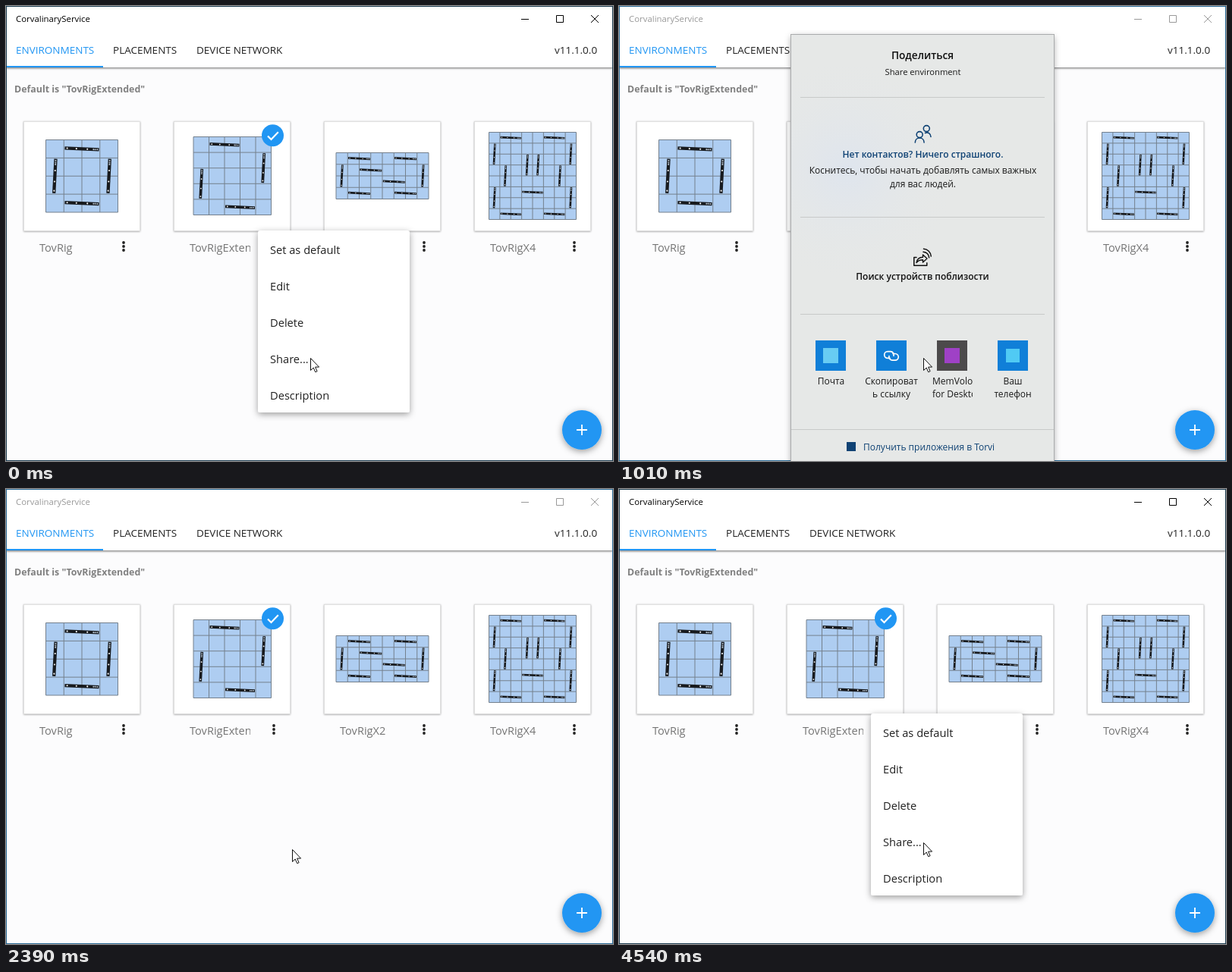
An HTML page that plays this animation: 800 px wide and 600 px high, repeating every 4.74 s.

```html
<!DOCTYPE html>
<html lang="en">
<head>
<meta charset="utf-8">
<title>Share an environment</title>
<style>
  html, body { margin: 0; width: 100%; height: 100%; overflow: hidden; background: #fcfcfd; }
  svg { display: block; width: 800px; height: 600px; }
  text { font-family: "Open Sans", "Noto Sans", sans-serif; white-space: pre; }
  .mid { text-anchor: middle; }
  .semi { font-weight: 600; }
  .line { fill: none; stroke-linecap: round; stroke-linejoin: round; }
</style>
</head>
<body>
<svg id="stage" viewBox="0 0 800 600" xmlns="http://www.w3.org/2000/svg"></svg>
<script>
const LOOP = 4740, STEP = 70;
const BLUE = '#2196f3', NAVY = '#0f4274', TILE = '#0078d7';
const KIT = 'TovRig';
const stage = document.getElementById('stage');

// ---- drawing helpers ----
const text = (x, y, size, fill, str, cls = '') =>
  `<text x="${x}" y="${y}" font-size="${size}" fill="${fill}" class="${cls}">${str}</text>`;
const rect = (x, y, w, h, fill, more = '') =>
  `<rect x="${x}" y="${y}" width="${w}" height="${h}" fill="${fill}" ${more}/>`;
const circle = (x, y, r, fill, more = '') =>
  `<circle cx="${x}" cy="${y}" r="${r}" fill="${fill}" ${more}/>`;
const line = (d, stroke, width, more = '') =>
  `<path class="line" d="${d}" stroke="${stroke}" stroke-width="${width}" ${more}/>`;
const shadow = (id, dy, blur, alpha) =>
  `<filter id="${id}" x="-30%" y="-30%" width="160%" height="160%">
    <feDropShadow dx="0" dy="${dy}" stdDeviation="${blur}" flood-opacity="${alpha}"/></filter>`;

// A tracking bar two cells long, centred on a cell coordinate.
function bar(cell, cx, cy, upright) {
  const len = cell * 1.9, thick = Math.max(2.4, cell * 0.18), r = thick * 0.24;
  const dots = [-0.43, -0.16, 0.16, 0.34, 0.39, 0.45]
    .map(k => circle((k * len).toFixed(2), 0, r.toFixed(2), k < 0.2 ? '#fff' : '#b8c4d0')).join('');
  return `<g transform="translate(${cx} ${cy}) rotate(${upright ? -87 : 2.5})">` +
    rect(-len / 2, -thick / 2, len, thick, '#171a1e') + dots + '</g>';
}

function floor(x, y, w, h, cols, rows, flat, upright) {
  const cw = w / cols, ch = h / rows;
  let d = `M${x} ${y}h${w}v${h}h${-w}z`;
  for (let i = 1; i < cols; i++) d += `M${x + i * cw} ${y}v${h}`;
  for (let i = 1; i < rows; i++) d += `M${x} ${y + i * ch}h${w}`;
  const place = up => ([a, b]) => bar(cw, x + a * cw, y + b * ch, up);
  return `<path d="${d}" fill="#aecdf1" stroke="#74808d" stroke-width="1"/>` +
    flat.map(place(false)).join('') + upright.map(place(true)).join('');
}

const kebab = x => [312, 317, 322].map(y => circle(x, y, 1.9, '#222')).join('');

function card(i, name, plan) {
  const x = 23 + 198 * i;
  return rect(x + .5, 152.5, 153, 144, '#fff', 'filter="url(#soft)" stroke="#d6d6d6" stroke-width=".6"') + plan +
    `<g clip-path="url(#label${i})">${text(x + 21, 324, 14.6, '#757575', name)}</g>` + kebab(x + 132);
}

// ---- parts of the scene ----
const cards = [
  card(0, KIT, floor(52.5, 176.5, 95, 95.5, 4, 4, [[2, .5], [2, 3.5]], [[.5, 2], [3.5, 2]])),
  card(1, KIT + 'Extended', floor(247, 172.5, 102.5, 103, 5, 5, [[2, .5], [3, 4.5]], [[.5, 3], [4.5, 2]])),
  card(2, KIT + 'X2', floor(435, 193.5, 122, 61, 8, 4,
    [[2, .5], [6, .5], [3, 1.5], [5, 2.5], [2, 3.5], [6, 3.5]], [[.5, 2], [7.5, 2]])),
  card(3, KIT + 'X4', floor(636.5, 166.5, 115, 115, 8, 8,
    [[2, .5], [6, .5], [4, 5.5], [2, 7.5], [6, 7.5]],
    [[.5, 2], [7.5, 2], [1.5, 4], [3.5, 3], [4.5, 3], [6.5, 4], [.5, 6], [7.5, 6]]))
].join('');

const header =
  rect(0, 0, 800, 81, '#fff', 'filter="url(#bar)"') +
  text(13, 63, 13.5, BLUE, 'ENVIRONMENTS') +
  text(141, 63, 13.5, '#212121', 'PLACEMENTS') +
  text(251, 63, 13.5, '#212121', 'DEVICE NETWORK') +
  text(723, 63, 13.5, '#212121', 'v11.1.0.0') +
  rect(0, 79, 128, 2, BLUE) +
  `<g id="caption">${text(13, 21, 11.4, 'currentColor', 'CorvalinaryService')}
   <path d="M679 17.5h10M725.5 12.5h9v9h-9zM771 12l10 10M781 12l-10 10" fill="none" stroke="currentColor"/></g>`;

const badge = circle(351.5, 170.7, 14.5, BLUE) +
  '<path d="M345 171.5l4.5 4.5 9.3-9.8" fill="none" stroke="#fff" stroke-width="2.2"/>';

const fab = circle(759, 559, 26, BLUE, 'filter="url(#lift)"') +
  '<path d="M752 559h14M759 552v14" stroke="#fff" stroke-width="1.8"/>';

const menu = rect(332, 296, 200, 240, '#fff', 'rx="3" filter="url(#lift)"') +
  ['Set as default', 'Edit', 'Delete', 'Share...', 'Description']
    .map((s, i) => text(348, 327 + 48 * i, 14.65, '#212121', s)).join('');

const people =
  circle(405.3, 161.6, 4, 'none', `stroke="${NAVY}" stroke-width="1.6"`) +
  circle(396.2, 169.6, 4, 'none', `stroke="${NAVY}" stroke-width="1.6"`) +
  line('M390.3 180c0-8 11.8-8 11.8 0M403.5 167.4c4-1.6 7.5 1 7.5 5', NAVY, 1.6);

const nearby =
  line('M392 331.5h-3.2v10.7h17v-3.4', '#111', 1.5) +
  line('M392 338.5c.8-5 4-7.300 8.500-7.300v-3.200l5.500 5-5.500 5v-3.200c-3.800 0-6.500 1-8.500 3.700z', '#111', 1.4) +
  line('M401 324.300c4.200.4 7.200 3.300 7.700 7.500M401.500 320.300c5.400.4 9.300 4.400 9.800 9.800', '#111', 1.5);

const chain = '<g class="line" stroke="#fff" stroke-width="1.7">' +
  '<path d="M357 465.300h-3a4.300 4.300 0 0 1 0-8.600h4a4.300 4.300 0 0 1 4 5.600"/>' +
  '<path d="M361 459.500h3a4.300 4.300 0 0 1 0 8.600h-4a4.300 4.300 0 0 1-4-5.600"/></g>';

const label = (x, a, b = '') => text(x, 501, 12, '#1a1a1a', a, 'mid') + text(x, 518, 12, '#1a1a1a', b, 'mid');

const panel =
  rect(227, 38, 346, 580, '#e6e8e7', 'filter="url(#lift)"') +
  rect(227, 38, 346, 562, 'url(#tint)') +
  rect(226.5, 37.5, 347, 580, 'none', 'stroke="#a9abac"') +
  '<g id="content">' +
  text(400, 70, 13.7, '#111', 'Поделиться', 'mid semi') +
  text(400.5, 91, 11.2, '#1a1a1a', 'Share environment', 'mid') +
  rect(239, 120, 322, 1, '#c8cac9') + people +
  text(400.5, 200, 12, NAVY, 'Нет контактов? Ничего страшного.', 'mid semi') +
  text(400.5, 221, 12, '#1a1a1a', 'Коснитесь, чтобы начать добавлять самых важных', 'mid') +
  text(400.5, 239, 12, '#1a1a1a', 'для вас людей.', 'mid') +
  rect(239, 278, 322, 1, '#c8cac9') + nearby +
  rect(227, 558, 346, 1, '#c8cac9') +
  rect(300, 575, 12, 12, NAVY) +
  text(322, 586, 12, NAVY, 'Получить приложения в Torvi') +
  '<g id="lower">' +
  text(400, 362, 12, '#111', 'Поиск устройств поблизости', 'mid semi') +
  rect(239, 407, 322, 1, '#c8cac9') +
  rect(319, 430, 80, 99, '#000', 'id="hover"') +
  '<g id="tiles">' +
  rect(259, 442, 40, 40, TILE) + rect(269, 452, 20, 20, '#5fcaf4') +
  rect(339, 442, 40, 40, TILE) + `<g id="chain">${chain}</g>` +
  rect(419, 442, 40, 40, '#413f40') + rect(429, 452, 20, 20, '#9a35c4') +
  rect(499, 442, 40, 40, TILE) + rect(510, 453, 18, 18, '#45c8f5') + '</g></g>' +
  '<g id="labels">' + label(279.5, 'Почта') +
  `<g id="copy">${label(359, 'Скопироват', 'ь ссылку')}</g>` +
  `<g clip-path="url(#appName)">${text(413, 501, 12, '#1a1a1a', 'MemVolo')}${text(413, 518, 12, '#1a1a1a', 'for Desktop')}</g>` +
  label(519, 'Ваш', 'телефон') + '</g></g>';

const clip = (id, x, y, w, h) => `<clipPath id="${id}">${rect(x, y, w, h, '#000')}</clipPath>`;

stage.innerHTML = `<defs>
  ${shadow('soft', .6, 1.3, .42)}${shadow('bar', 1, 1.6, .6)}${shadow('lift', 2.5, 4, .38)}
  ${[0, 1, 2, 3].map(i => clip('label' + i, 43 + 198 * i, 300, 81, 36)).join('')}
  ${clip('appName', 412, 486, 54, 40)}
  <radialGradient id="tint" gradientUnits="userSpaceOnUse" cx="300" cy="215" r="150">
    <stop offset="0" stop-color="#dde4ef" stop-opacity=".85"/>
    <stop offset="1" stop-color="#e6e8e7" stop-opacity="0"/></radialGradient>
  </defs>` +
  rect(0, 0, 800, 600, '#fcfcfd') + header +
  text(11, 114, 12.4, '#808080', `Default is "${KIT}Extended"`, '" font-weight="700') +
  cards + badge + fab +
  rect(.5, .5, 799, 599, 'none', 'id="frame"') +
  `<g id="menu">${menu}</g><g id="panel">${panel}</g>
  <g id="pointer"><g id="click">${circle(1, 1, 15, '#000', 'opacity=".08"')}${circle(1, 1, 13.5, '#f3ec3a', 'opacity=".72"')}</g>
  <path d="M.5.5v16l3.700-3.500 2.500 5.700 2.400-1-2.500-5.600h5z" fill="#fff" stroke="#111" stroke-width="1"/></g>`;

// ---- motion ----
const el = id => document.getElementById(id);
const clamp = v => Math.min(1, Math.max(0, v));
const ramp = (t, a, b) => clamp((t - a) / (b - a));
const easeIn = k => k * k;
const easeOut = k => 1 - (1 - k) ** 3;
const smooth = k => k * k * (3 - 2 * k);
const fade = (id, v) => {
  el(id).setAttribute('opacity', v);
  el(id).setAttribute('visibility', v > 0 ? 'inherit' : 'hidden');
};
const move = (id, x, y) => el(id).setAttribute('transform', `translate(${x} ${y})`);

// Pointer stops: time, x, y and the easing used to get there.
const path = [
  [0, 401, 464, smooth], [1080, 401, 464, smooth], [1430, 377, 475, smooth],
  [2590, 377, 475, smooth], [3150, 359, 317, smooth], [3220, 352, 316, smooth],
  [3560, 352, 316, smooth], [3910, 391, 401, easeIn], [4470, 401, 465, easeOut],
  [4540, 401, 466, smooth], [LOOP, 401, 466, smooth]
];
const clicks = [590, 1630, 3420];
const bursts = [590, 1630, 2660, 3420];

function pointerAt(t) {
  const i = Math.max(1, path.findIndex(p => t <= p[0]));
  const [ta, xa, ya] = path[i - 1], [tb, xb, yb, ease] = path[i];
  const k = ease(ramp(t, ta, tb));
  return [Math.round(xa + (xb - xa) * k), Math.round(ya + (yb - ya) * k)];
}

function snap(t) {
  const start = bursts.filter(b => b <= t).pop();
  return start === undefined ? 0 : start + Math.floor((t - start) / STEP) * STEP;
}

function draw(now) {
  const t = snap(now % LOOP);

  const idle = t >= 660 && t < 2400;
  el('caption').setAttribute('color', idle ? '#999' : '#000');
  el('frame').setAttribute('stroke', idle ? '#2a6a96' : '#1d3c50');

  const open = easeOut(ramp(t, 3490, 3700));
  const grow = t < 3420 ? 1 : .8 + .2 * open;
  fade('menu', t < 3420 ? 1 - ramp(t, 590, 730) : open);
  el('menu').setAttribute('transform', `translate(332 296) scale(${grow}) translate(-332 -296)`);

  fade('panel', ramp(t, 730, 870) * (1 - ramp(t, 2120, 2330)));
  fade('content', ramp(t, 800, 940));
  fade('tiles', easeOut(ramp(t, 800, 1160)));
  const settle = 1 - smooth(ramp(t, 1010, 1430));
  move('lower', 0, -settle);
  move('labels', 0, -1.8 * settle);
  fade('hover', .07 * ramp(t, 1360, 1430) * (1 - ramp(t, 1630, 1840)));
  const shown = 1 - ramp(t, 1700, 1910);
  fade('chain', shown);
  fade('copy', shown);

  move('pointer', ...pointerAt(t));
  fade('click', clicks.some(c => t >= c && t < c + 2 * STEP) ? 1 : 0);
}

const began = performance.now();
function tick() {
  draw(performance.now() - began);
  requestAnimationFrame(tick);
}
tick();
</script>
</body>
</html>
```
